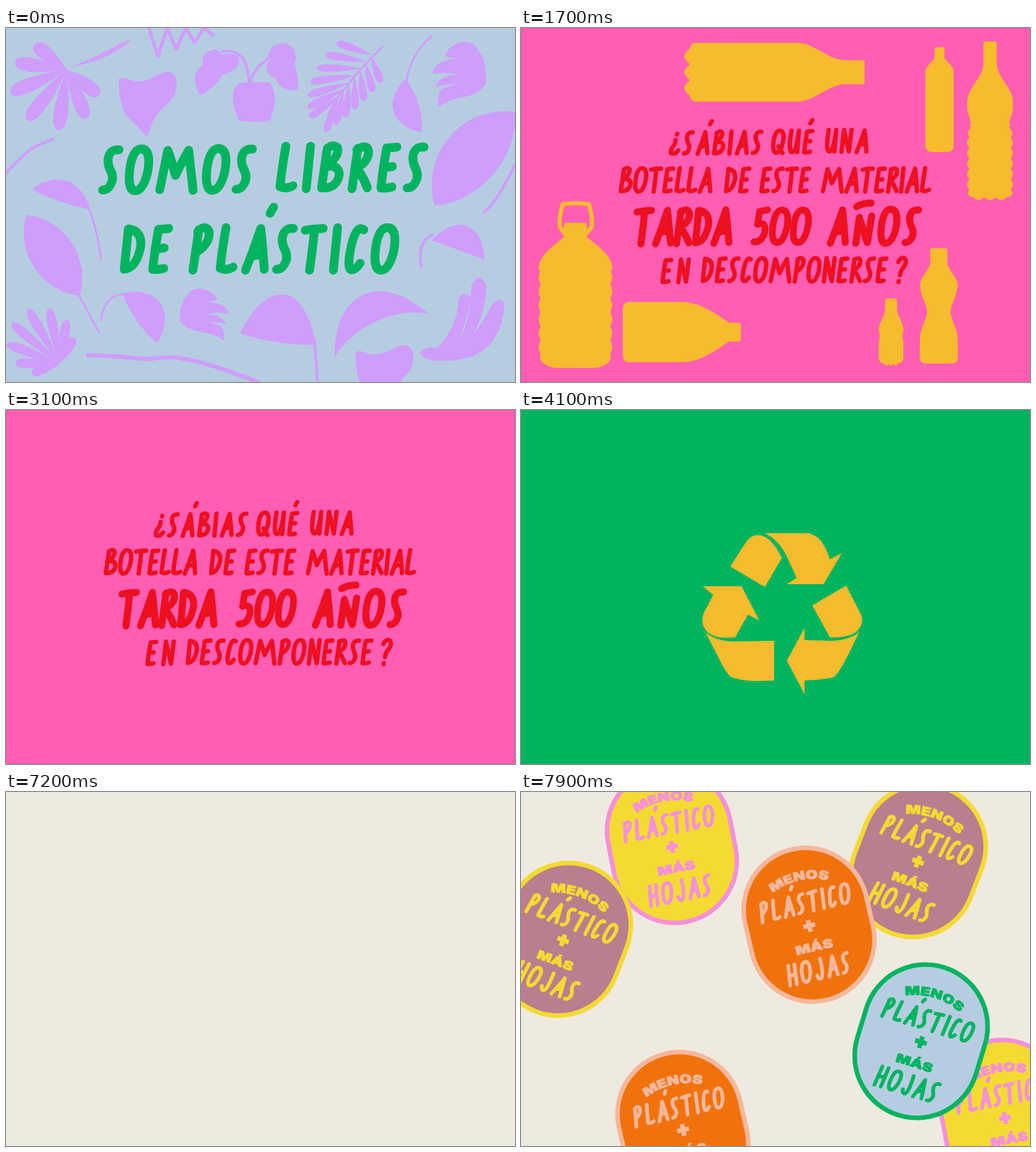
Animation, 720 px wide and 500 px high, one loop 8000 ms. Source, as an HTML page with a canvas:

```html
<!DOCTYPE html>
<html lang="es">
<head>
<meta charset="utf-8">
<title>Libres de plástico</title>
<style>
html, body { margin: 0; width: 100%; height: 100%; overflow: hidden; }
canvas { display: block; width: 720px; height: 500px; }
</style>
</head>
<body>
<canvas id="stage" width="720" height="500"></canvas>
<script>
const ctx = document.getElementById('stage').getContext('2d');
const LOOP = 8000;
const GREEN = '#00b45f', SKY = '#b6cde1', LILAC = '#cf9dfc', PINK = '#ff5eb3',
      RED = '#ed1020', AMBER = '#f7bb2e', CREAM = '#efeadf';
const rad = deg => deg * Math.PI / 180;
const lerp = (a, b, p) => a + (b - a) * p;

// Draws with a moved, turned and scaled origin
function at(x, y, deg, sx, sy, paint) {
  ctx.save();
  ctx.translate(x, y);
  ctx.rotate(rad(deg));
  ctx.scale(sx, sy);
  paint();
  ctx.restore();
}

function background(color, ink) {
  ctx.fillStyle = color;
  ctx.fillRect(0, 0, 720, 500);
  ctx.fillStyle = ctx.strokeStyle = ink;
}

function line(width, d) {
  ctx.lineWidth = width;
  ctx.stroke(new Path2D(d));
}

// ---- hand lettering: [width, strokes], cap height 100 ----
const A = 'M0 100Q17 50 30 2Q38 50 44 98M10 68L38 62';
const E = 'M32 2L8 4Q2 50 0 98Q12 100 26 96M4 50L24 48';
const O = 'M25 0C8 0 0 28 0 62C0 88 6 100 17 100C34 100 45 65 45 35C45 12 38 0 25 0Z';
const I = 'M4 0L0 100';
const GLYPHS = {
  A: [45, A], 'Á': [45, A + 'M57 -48L50 -34'],
  B: [40, 'M8 5L0 98M8 5Q22 -6 32 4Q38 24 8 48Q38 42 40 68Q36 100 0 98'],
  C: [32, 'M32 5Q14 -8 5 42Q-4 98 10 99Q20 98 28 84'],
  D: [40, 'M7 3L3 98Q30 96 38 48Q42 8 7 3'],
  E: [32, E], 'É': [32, E + 'M28 -48L21 -34'],
  H: [38, 'M6 0L0 100M38 0L34 100M4 54L36 48'],
  I: [4, I], 'Í': [4, I + 'M10 -42L6 -30'],
  J: [30, 'M28 0Q34 98 14 99Q3 98 0 80'],
  L: [30, 'M8 0Q2 50 0 95Q15 102 30 93'],
  M: [80, 'M0 98L14 4Q25 30 36 64Q50 30 64 4L80 100'],
  N: [40, 'M6 0L0 100M6 2L34 98L40 0'],
  'Ñ': [42, 'M6 24L0 100M6 26L34 98L42 20M-4 -8Q16 -18 38 -18'],
  O: [45, O], 0: [45, O], Q: [45, O + 'M24 72L44 102'],
  P: [34, 'M8 5L0 100M6 10Q22 -10 33 10Q36 38 6 58'],
  R: [36, 'M8 5L0 100M6 8Q30 -8 34 14Q34 38 6 52Q20 62 36 98'],
  S: [30, 'M32 2Q8 0 7 26Q8 42 16 54Q26 74 12 92Q7 98 -2 98'],
  T: [42, 'M0 6Q20 2 42 2M22 4Q20 50 16 100'],
  U: [38, 'M4 0Q-6 98 13 98Q32 98 38 0M38 0L36 98'],
  5: [36, 'M36 0L12 4L8 44Q34 34 32 66Q26 100 0 98'],
  '¿': [34, 'M26 8L25 11M20 36Q20 56 6 70Q-6 98 10 99Q26 98 34 84'],
  '?': [32, 'M0 16Q10 -8 26 2Q38 18 22 40Q10 54 10 70M6 96L6 99']
};
for (const k in GLYPHS) GLYPHS[k][1] = new Path2D(GLYPHS[k][1]);
const SLANT = .06;

function write(word, x, y, height, weight, gap = 30, tilt = 0) {
  const k = height / 100;
  at(x + weight / 2, y, tilt, k, k, () => {
    ctx.transform(1, 0, -SLANT, 1, 50 * SLANT, 0);
    ctx.lineWidth = weight / k;
    for (const c of word) {
      const [w, path] = GLYPHS[c];
      ctx.stroke(path);
      ctx.translate(w + gap, 0);
    }
  });
}

// ---- leaves ----
const HEART = new Path2D('M0 11C6 4 13 12 26 13C46 14 56 0 69 0C81 0 84 12 82 23C79 43 61 50 53 63C46 75 44 86 40 92C33 84 26 76 17 68C3 56 1 33 0 11Z');
const NOTCHED = new Path2D('M48 1Q64 2 68 14Q80 27 79 60Q68 77 45 80Q25 84 11 94Q9 77 15 70Q28 62 40 62Q22 61 7 66Q12 48 41 48Q20 43 5 47Q0 44 12 32Q28 24 42 27Q25 23 21 22Q25 6 48 1Z');
const POT = new Path2D('M329 78Q350 75 374 77Q388 100 372 132Q350 134 330 131Q312 95 329 78Z' +
  'M296 30Q304 33 305 38Q318 34 328 40Q336 58 305 67Q300 80 288 86Q278 95 274 95Q258 64 279 52Q274 34 296 30Z' +
  'M388 22Q404 20 409 36Q412 44 408 50Q415 72 412 88Q384 88 382 71Q360 64 374 43Q368 26 388 22Z');
const HAND = new Path2D('M585 460Q590 448 610 452Q640 420 640 382Q648 370 657 380Q655 405 640 440Q656 420 658 365Q670 340 680 365Q677 405 660 435Q675 415 688 390Q700 378 705 390Q700 470 620 470Q595 472 585 460Z');

// Pointed leaf between two points; a and b bow its sides
function leaf(x0, y0, x1, y1, a, b) {
  const len = Math.hypot(x1 - x0, y1 - y0);
  at(x0, y0, Math.atan2(y1 - y0, x1 - x0) / rad(1), len, len, () => {
    ctx.beginPath();
    ctx.moveTo(0, 0);
    ctx.bezierCurveTo(.25, a, .75, a, 1, 0);
    ctx.bezierCurveTo(.75, b, .25, b, 0, 0);
    ctx.fill();
  });
}

// Drop-shaped leaflet growing out of a point
function lobe(x, y, deg, len, w) {
  at(x, y, deg, len, w, () => {
    ctx.beginPath();
    ctx.moveTo(0, 0);
    ctx.bezierCurveTo(.45, .45, 1, .75, 1, 0);
    ctx.bezierCurveTo(1, -.75, .45, -.45, 0, 0);
    ctx.fill();
  });
}

function fan(x, y, n, from, to, len, extra, w) {
  for (let i = 0; i < n; i++) {
    const p = i / (n - 1);
    lobe(x, y, lerp(from, to, p), len + extra * Math.sin(Math.PI * p), w);
  }
}

function fern() {
  line(3, 'M533 26Q500 58 480 85Q465 102 456 122');
  for (let i = 0; i < 7; i++) {
    const p = i / 6, x = lerp(518, 472, p), y = lerp(38, 96, p);
    lobe(x, y, lerp(199, 145, p), 53 + 12 * Math.sin(Math.PI * p), 12);
    lobe(x - 2, y + 2, lerp(68, 110, p), lerp(40, 52, p), 12);
  }
}

function zigzag() {
  ctx.lineWidth = 5;
  ctx.beginPath();
  for (let i = 0; i < 8; i++) ctx.lineTo(202 + i * 13, i % 2 ? 45 - i * 5 : 0);
  ctx.stroke();
}

function leafScene() {
  background(SKY, LILAC);
  fan(86, 59, 7, 218, 38, 58, 32, 22);
  ctx.fill(new Path2D('M177 15L173 21Q140 47 95 54L82 58Q120 45 148 29Z'));
  fan(76, 474, 8, 161, 299, 42, 48, 15);
  fern();
  zigzag();
  at(159, 62, 0, 1, 1, () => ctx.fill(HEART));
  at(494, 448, 0, 1, 1, () => ctx.fill(HEART));
  at(600, 18, 0, 1, 1, () => ctx.fill(NOTCHED));
  at(318, 367, 0, -.91, .78, () => ctx.fill(NOTCHED));
  ctx.fill(POT);
  ctx.fill(HAND);
  leaf(565, 72, 588, 147, .5, -.12);
  leaf(606, 251, 720, 118, .26, -.36);
  leaf(37, 228, 118, 256, .05, -.42);
  leaf(29, 264, 104, 378, .31, -.31);
  leaf(165, 374, 214, 445, .09, -.55);
  leaf(331, 431, 438, 447, .06, -.78);
  leaf(465, 466, 598, 404, -.2, -.58);
  leaf(602, 300, 677, 327, 0, -.6);
  line(4, 'M344 78Q343 60 337 46Q327 30 306 33M346 76Q350 60 362 50Q372 44 374 36');
  line(3, 'M602 11Q570 40 566 78M112 243Q128 275 134 326M100 372L131 429M168 376Q140 376 134 412');
  line(4, 'M721 190Q700 238 676 261M-2 207Q18 185 34 172Q45 165 67 157M436 440L441 501M604 292Q582 300 587 336');
  line(6, 'M116 462Q160 463 200 468Q220 464 245 466Q290 473 358 501');
  ctx.strokeStyle = GREEN;
  write('SOMOS', 133, 171, 59, 12.5, 30, -.3);
  write('LIBRES', 383, 167, 60, 12.5, 32);
  write('DE', 161, 282, 60, 12.5);
  write('PLÁSTICO', 260, 282, 60, 12.5);
}

// ---- bottles: sizes relative to height and half width ----
const TALL = { neck: .29, cap: .14, shoulder: .38, waist: .15, waistAt: .51, ribs: 7, depth: .1, ribsAt: .54, feet: 4 };
const SLIM = { neck: .35, cap: .11, shoulder: .24, round: true };
const CURVY = { neck: .45, cap: .12, shoulder: .32, waist: .38, waistAt: .55, waistSize: .13 };
const SMALL = { neck: .48, cap: .15, shoulder: .47, waist: .1, waistAt: .56, feet: 3 };
const WIDE = { neck: .41, cap: .11, shoulder: .37, feet: 8 };
const ROUND = { neck: .31, cap: .1, shoulder: .5, round: true };
const JUG = { neck: .31, cap: .1, shoulder: .31, round: true, ribs: 7, depth: .05, ribsAt: .33, corner: 22 };

const BOTTLES = [
  [TALL, 23, 27, 88, 222], [SLIM, 98, 19, 140, 179], [CURVY, 155, 19, 201, 170],
  [SMALL, 323, 419, 488, 463], [TALL, 636, 264, 691, 474], [SLIM, 513, 19, 552, 162],
  [TALL, 631, 19, 696, 243], [ROUND, 144, 387, 311, 472], [SMALL, 506, 382, 541, 477],
  [CURVY, 564, 311, 618, 474], [WIDE, 231, 21, 486, 104], [SLIM, 572, 27, 612, 175],
  [JUG, 25, 275, 129, 480]
];

function halfWidth(s, u) {
  if (u < s.cap) return s.neck;
  const p = Math.min(1, (u - s.cap) / (s.shoulder - s.cap));
  const ease = s.round ? Math.sin(p * Math.PI / 2) : p * p * (3 - 2 * p);
  let w = lerp(s.neck, 1, ease);
  if (s.waist) w -= s.waist * Math.exp(-(((u - s.waistAt) / (s.waistSize || .05)) ** 2));
  if (s.ribs && u > s.ribsAt) {
    const turn = (u - s.ribsAt) / (1 - s.ribsAt) * s.ribs * Math.PI;
    w -= s.depth * (1 - Math.abs(Math.sin(turn)));
  }
  return w;
}

function bottle([s, x0, y0, x1, y1]) {
  const flat = x1 - x0 > y1 - y0;
  const w = (flat ? y1 - y0 : x1 - x0) / 2, h = flat ? x1 - x0 : y1 - y0;
  const corner = s.corner || 8, feet = s.feet || 0, end = h - feet;
  const side = [];
  for (let y = 0; y <= end; y++) {
    const bend = Math.max(0, 1 - (end - y) / corner), lip = Math.max(0, 2 - y);
    side.push([w * halfWidth(s, y / h) - corner * (1 - Math.sqrt(1 - bend * bend)) - lip, y]);
  }
  const base = side[side.length - 1][0], bottom = [];
  for (let p = 1; p >= -1; p -= .05)
    bottom.push([base * p, end + feet * Math.abs(Math.sin(1.5 * Math.PI * (p + 1)))]);
  const outline = [...side, ...bottom, ...side.map(([x, y]) => [-x, y]).reverse()];
  at(flat ? x1 : (x0 + x1) / 2, flat ? (y0 + y1) / 2 : y0, flat ? 90 : 0, 1, 1, () => {
    ctx.beginPath();
    outline.forEach(p => ctx.lineTo(...p));
    ctx.fill();
  });
}

function bottleScene(t) {
  background(PINK, AMBER);
  const gone = Math.floor((t - 500) / 200);
  BOTTLES.slice(gone).forEach(bottle);
  if (gone < BOTTLES.length) line(6, 'M63 292L55 281Q53 268 59 249Q78 246 96 249Q102 268 100 281L90 293');
  ctx.strokeStyle = RED;
  write('¿SÁBIAS', 209, 147, 31, 6.2, 30, -.5);
  write('QUÉ', 354, 145, 31, 6.2);
  write('UNA', 430, 144, 31, 6.2);
  write('BOTELLA', 139, 198, 33, 6.2, 20);
  write('DE', 287, 198, 33, 6.2, 24);
  write('ESTE', 338, 198, 33, 6.2, 21);
  write('MATERIAL', 425, 198, 33, 6.2, 20);
  write('TARDA', 158, 257, 48, 10, 17, -.5);
  write('500', 326, 257, 46, 9.5, 19);
  write('AÑOS', 434, 256, 48, 10);
  write('EN', 198, 327, 32, 6.2, 38);
  write('DESCOMPONERSE', 254, 325, 33, 6.2, 23);
  write('?', 530, 325, 34, 6.2);
}

// ---- recycling ----
const ARROWS = new Path2D(
  'M296 221L320 184Q334 169 352 184Q362 194 369 209L345 250Z' +
  'M344 174H409L421 181Q430 190 437 211L454 202L428 246H376L390 237L376 207Q364 182 344 174Z' +
  'M257 249H312L337 297L321 289L303 321Q275 324 264 314Q250 300 262 280L272 261Z' +
  'M261 314Q275 326 300 327L358 326V382Q315 385 297 377Q290 372 278 347Z' +
  'M412 276L460 248L482 291Q485 305 472 315Q460 322 437 321Z' +
  'M376 354L401 308V325L440 326Q465 325 478 314Q455 365 444 376Q440 380 401 382V401Z');

function recycleScene(t) {
  background(GREEN, AMBER);
  ctx.fill(ARROWS);
  if (t >= 4800) write('REDUCÍ', 119, 341, 39, 8, 24, -1);
  if (t >= 5500) write('RECICLÁ', 303, 114, 39, 8, 24, -1);
  if (t >= 6200) write('REUSÁ', 491, 341, 39, 8, 23, -1);
}

// ---- stickers ----
const PLUM = ['#b97f8e', '#f3db32'], LEMON = ['#f3db32', '#f590dc'],
      ORANGE = ['#f1720d', '#f6b89c'], MINT = [SKY, GREEN];
const STICKERS = [
  [562, 97, 21, PLUM], [213.5, 76, -11, LEMON], [60, 208, 21, PLUM], [407.5, 187.5, -13, ORANGE],
  [684.5, 459, -11, LEMON], [566, 352, 17, MINT], [229, 476, -13, ORANGE]
];
const WIDEN = 1.3;

function capsule(r, half) {
  ctx.beginPath();
  ctx.arc(0, -half, r, Math.PI, 0);
  ctx.arc(0, half, r, 0, Math.PI);
  ctx.fill();
}

function arched(word, y, radius) {
  const width = c => ctx.measureText(c).width * WIDEN;
  let s = -[...word].reduce((sum, c) => sum + width(c), 0) / 2;
  for (const c of word) {
    const turn = (s + width(c) / 2) / radius;
    at(radius * Math.sin(turn), y + radius * (1 - Math.cos(turn)), turn / rad(1), WIDEN, 1, () => {
      ctx.fillText(c, 0, 0);
      ctx.strokeText(c, 0, 0);
    });
    s += width(c);
  }
}

function sticker([x, y, deg, [fill, ink]]) {
  at(x, y, deg, 1, 1, () => {
    ctx.fillStyle = ctx.strokeStyle = ink;
    capsule(91, 21.5);
    ctx.fillStyle = fill;
    capsule(84.5, 21.5);
    ctx.fillStyle = ink;
    ctx.font = '900 17px Inter, sans-serif';
    ctx.textAlign = 'center';
    ctx.lineWidth = .9;
    arched('MENOS', -64, 95);
    arched('MÁS', 38, 1000);
    ctx.fillRect(-8.5, -2, 17, 6.5);
    ctx.fillRect(-3.25, -7, 6.5, 17);
    write('PLÁSTICO', -65, -45, 27, 5.2);
    write('HOJAS', -47, 50, 28, 5.2);
  });
}

function stickerScene(t) {
  background(CREAM, CREAM);
  STICKERS.slice(0, Math.floor((t - 7200) / 100)).forEach(sticker);
}

function draw(t) {
  ctx.lineCap = ctx.lineJoin = 'round';
  if (t < 500) leafScene();
  else if (t < 4100) bottleScene(t);
  else if (t < 7200) recycleScene(t);
  else stickerScene(t);
}

const start = performance.now();
function tick() {
  draw((performance.now() - start) % LOOP);
  requestAnimationFrame(tick);
}
tick();
</script>
</body>
</html>
```
